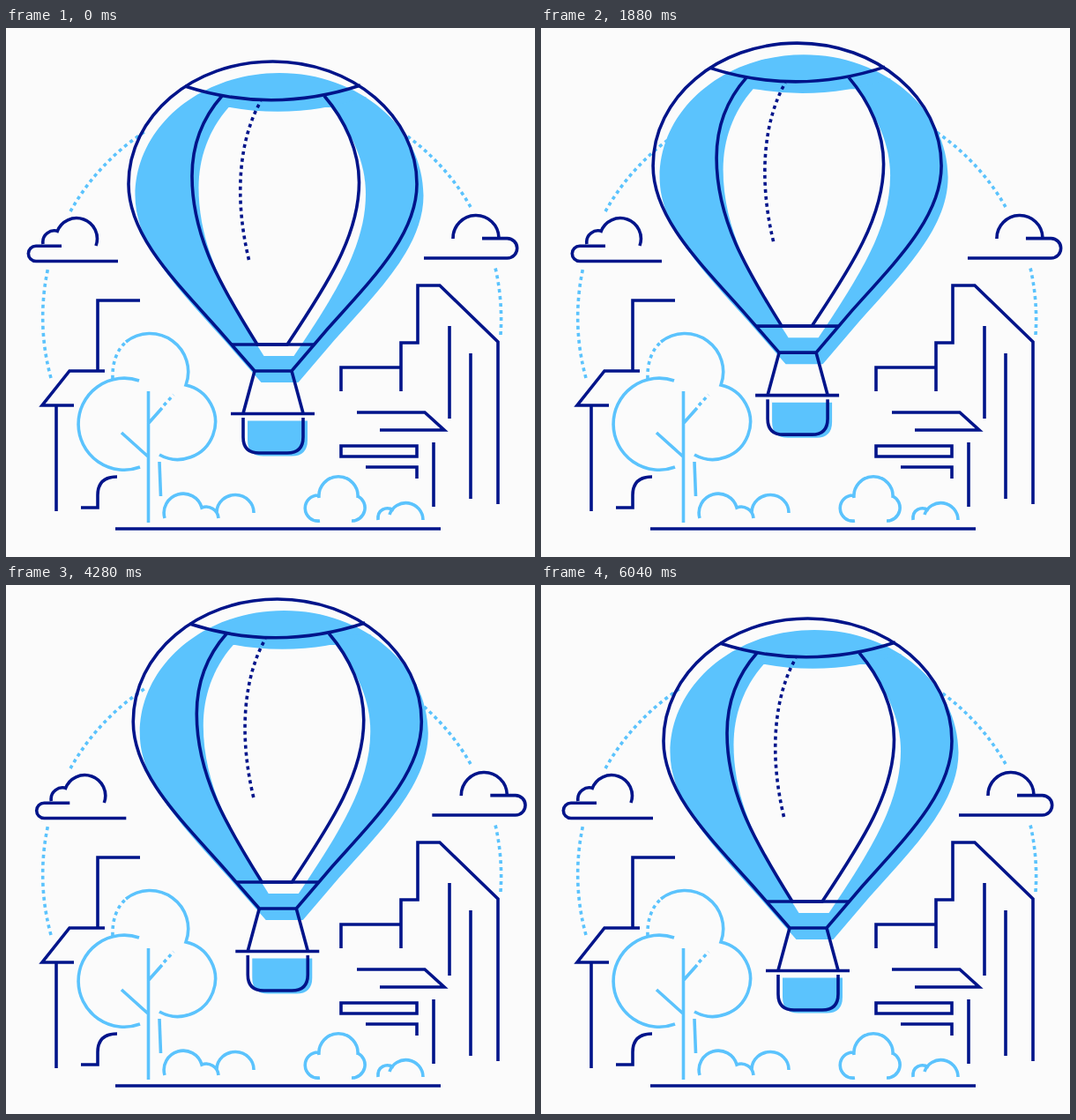
Animation of 600 by 600 pixels, one loop 6080 ms. Source, as an HTML page:

```html
<!DOCTYPE html>
<html lang="en">
<head>
<meta charset="utf-8">
<title>Balloon over town</title>
<style>
  html, body { margin: 0; width: 100%; height: 100%; overflow: hidden; background: #fbfbfb; }
  svg { display: block; width: 100%; height: 100%; fill: none; stroke-width: 3.6; }
  .navy { stroke: #00148a; }
  .sky { stroke: #5bc3fd; }
  .tint { fill: #5bc3fd; }
  .paper { fill: #fbfbfb; }
  .dots { stroke-dasharray: 4 4; }
</style>
</head>
<body>
<svg viewBox="0 0 600 600">
  <defs>
    <path id="envelope" d="M282 389L240 341C190 285 139 235 139 177C139 100 212 38 302.5 38
      S466 100 466 177C466 235 415 285 365 341L324 389Z"/>
    <path id="panel" d="M245 77C222 103 211 135 211 168C211 238 245 295 285 359H319C365 290 400.500 235 400.500 175C400.500 140 385 105 361 77"/>
    <path id="cap" d="M203 66Q302 98 402 65"/>
    <path id="basket" d="M269 442V464Q269 482 287 482H319Q337 482 337 464V442"/>
  </defs>

  <!-- dotted ring -->
  <path class="sky dots" d="M73 208A258 258 0 0 1 160 116M51 397A260 260 0 0 1 48 271
    M527 203A258 258 0 0 0 447 117M561 348A260 260 0 0 0 555 272"/>

  <!-- buildings and ground -->
  <path class="navy" d="M152 309H104V389M112 389H72L41 428H77M57 428V548M85 544H104V530Q104 509 126 509"/>
  <path class="navy" d="M380 412V385H448M448 412V357H467V292H492L558 356V540M503 338V443M527 369V534
    M398 436H475L497 456H424M380 474H466V486H380ZM408 498H466V511M485 470V543"/>
  <path class="navy" d="M124 568H493"/>

  <!-- tree -->
  <path class="sky" d="M161.5 412V561M161 449L177 431M131 459L161 486M174 492L175.5 531
    M151 400A52 52 0 1 0 152 498M136 356A43.5 43.5 0 0 1 204 405A42.7 42.7 0 1 1 174 484"/>
  <path class="sky dots" d="M121 398Q120 371 136 356M179 428L190 416"/>

  <!-- bushes -->
  <path class="sky" d="M180 556A21.5 21.5 0 0 1 222 544A14 14 0 0 1 241 556M239 549A21 20 0 0 1 281 550"/>
  <path class="sky" d="M355 533A22.1 22.1 0 1 1 399 533M355 530A14.6 14.6 0 1 0 356 559M399 531A14.8 14.8 0 0 1 392 559"/>
  <path class="sky" d="M422 558C421 546 431 542 440 547M435 552A19.5 19.5 0 0 1 473 558"/>

  <g id="clouds" class="navy">
    <path d="M127 264.5H34a8.6 8.6 0 0 1 0-17.2H63M42 245A13 13 0 0 1 60 231M58 231A23.4 23.4 0 0 1 102 247"/>
    <path d="M474 261H568.5a11.2 11.2 0 0 0 0-22.4H540M507 239A26 26 0 0 1 559 238"/>
  </g>

  <g id="balloon">
    <g class="tint" transform="translate(7.5 13)">
      <use href="#envelope"/>
      <use href="#panel" class="paper"/>
      <use href="#cap"/>
    </g>
    <use href="#basket" class="tint" transform="translate(5 3.5)"/>
    <g class="navy">
      <use href="#envelope"/>
      <use href="#panel"/>
      <use href="#cap"/>
      <use href="#basket"/>
      <path d="M256 359H350M282 389L269 437M324 389L337 437M255 437.5H350"/>
      <path class="dots" d="M275.5 263C258 190 265 125 289 83"/>
    </g>
  </g>
</svg>
<script>
const LOOP = 6080, STEP = 40, TRAVEL = LOOP - STEP;
const balloon = document.getElementById('balloon');
const clouds = document.getElementById('clouds');

const move = (el, x, y) => el.setAttribute('transform', `translate(${x.toFixed(2)} ${y.toFixed(2)})`);

// Two teardrop rounds per loop, each rising from the rest point and sinking back:
// the first turns leftwards over the top, the second swings out to the right.
function drift(progress) {
  const second = progress >= 0.5;
  const angle = Math.PI * (progress * 2 - (second ? 1 : 0));
  const lift = Math.max(0, Math.sin(angle)) ** 1.3;
  const c = Math.cos(angle);
  return [lift * (second ? 10 * (1 - c) ** 2 : 35 * c), -23 * lift];
}

const start = performance.now();
function draw() {
  const elapsed = (performance.now() - start) % LOOP;
  const progress = Math.floor(elapsed / STEP) * STEP / TRAVEL;
  move(balloon, ...drift(progress));
  move(clouds, 16 * (1 - Math.abs(1 - 2 * progress)), 0);
  requestAnimationFrame(draw);
}
draw();
</script>
</body>
</html>
```
